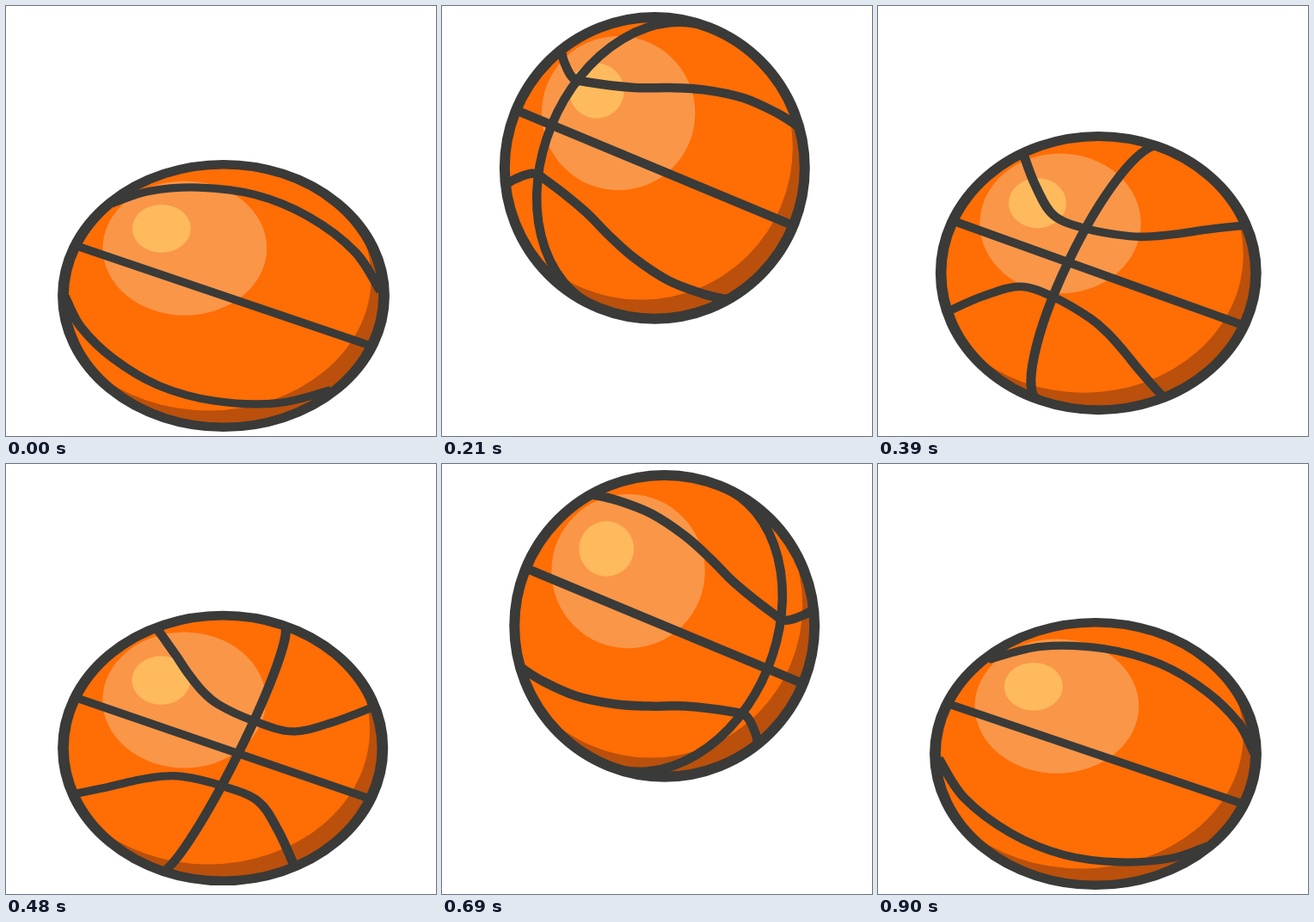
Recreate the animation shown at these times as an HTML page. Size 500 by 500 pixels, loop 0.93 s.

```html
<!DOCTYPE html>
<html lang="en">
<head>
<meta charset="utf-8">
<title>Bouncing ball</title>
<style>
  html, body { margin: 0; width: 100%; height: 100%; overflow: hidden; background: #fff; }
  svg { display: block; width: 100%; height: 100%; }
</style>
</head>
<body>
<svg viewBox="0 0 500 500">
  <defs>
    <clipPath id="disc"><circle r="180"/></clipPath>
  </defs>
  <g id="ball">
    <g clip-path="url(#disc)">
      <circle r="178" fill="#ba500b"/>
      <circle cx="-16" cy="-24" r="177" fill="#ff6d05"/>
      <circle cx="-42.3" cy="-63.5" r="89.5" fill="#fa9648"/>
      <circle cx="-67.7" cy="-89.5" r="32" fill="#feba5c"/>
      <g transform="rotate(22.5)" fill="none" stroke="#3a3a38" stroke-width="10.5">
        <path d="M-175 0H175"/>
        <path id="meridian"/>
        <path id="upper"/>
        <path id="lower"/>
      </g>
    </g>
    <circle r="175" fill="none" stroke="#3a3a38" stroke-width="12"/>
  </g>
</svg>
<script>
const LOOP = 930, STEP = 30, BOUNCE = 450, R = 175;
const $ = id => document.getElementById(id);
const ball = $('ball'), meridian = $('meridian'), upper = $('upper'), lower = $('lower');

const mix = (a, b, k) => a + (b - a) * k;
const smooth = k => k * k * (3 - 2 * k);

// Side seam for four spin angles: x along the equator, height above it.
const ANGLES = [0, 30, 66, 90];
const SEAMS = [
  [[-128, 118], [-88, 78], [-50, 50], [0, 45], [40, 46], [62, 56], [82, 72], [100, 90], [114, 104], [128, 118]],
  [[-147, 96], [-137, 75], [-110, 48], [-83, 51], [-26, 73], [5, 84], [36, 94.4], [70, 106], [100, 115], [126.5, 120]],
  [[-160, 75], [-154, 73.5], [-147, 72.5], [-138, 73], [-89, 81], [-45, 101], [0, 117], [58, 123], [114, 112], [144, 97.5]],
  [[-160, 66], [-159, 67.5], [-158, 69], [-156, 71], [-128, 98], [-80, 123], [-20, 137.5], [45, 133], [110, 109], [156, 71]]
];

// Slow start out of the squash, softer stop: cubic-bezier(.45, 0, .667, 1).
function ease(x) {
  let lo = 0, hi = 1;
  for (let i = 0; i < 24; i++) {
    const s = (lo + hi) / 2, r = 1 - s;
    if (1.35 * s * r * r + 2 * s * s * r + s * s * s < x) lo = s; else hi = s;
  }
  return smooth(lo);
}

// The fall mirrors the rise.
function pose(phase) {
  const rising = phase <= BOUNCE / 2;
  const t = rising ? phase : BOUNCE - phase;
  let dx, y, q = 1;
  if (t < 150) {
    q = ease(t / 150);
    dx = -7.75 * Math.sin(q * Math.PI / 2);
    y = mix(337, 242.5, q);
  } else {
    const f = Math.min(1, 2 * smooth((t - 150) / 150));
    dx = -7.75 + 15.5 * smooth((1 - Math.sqrt(1 - f)) / 2);
    y = 242.5 - 77 * f;
  }
  return { x: 253 + (rising ? dx : -dx), y, sx: mix(1.066, 0.997, q), sy: mix(0.873, 1.002, q) };
}

function seam(angle) {
  const a = Math.abs(angle), side = angle > 0 ? -1 : 1;
  let i = 0;
  while (i < 2 && a > ANGLES[i + 1]) i++;
  const k = (a - ANGLES[i]) / (ANGLES[i + 1] - ANGLES[i]);
  return SEAMS[i].map(([x, h], n) => {
    const [x2, h2] = SEAMS[i + 1][n];
    return [side * mix(x, x2, k), mix(h, h2, k)];
  });
}

// Catmull-Rom curve through the points.
function curve(pts, flip) {
  const at = n => pts[Math.max(0, Math.min(pts.length - 1, n))];
  const put = (x, y) => x.toFixed(2) + ' ' + (flip * y).toFixed(2) + ' ';
  let d = 'M' + put(...pts[0]);
  for (let n = 0; n < pts.length - 1; n++) {
    const [a, b, c, e] = [at(n - 1), at(n), at(n + 1), at(n + 2)];
    d += 'C' + put(b[0] + (c[0] - a[0]) / 6, b[1] + (c[1] - a[1]) / 6)
      + put(c[0] - (e[0] - b[0]) / 6, c[1] - (e[1] - b[1]) / 6) + put(...c);
  }
  return d;
}

function draw(now) {
  const t = Math.floor((now % LOOP) / STEP) * STEP;
  const p = pose(t % BOUNCE);
  ball.setAttribute('transform', `translate(${p.x} ${p.y}) scale(${p.sx} ${p.sy})`);

  const angle = t / 5 - 90;
  const rx = Math.abs(R * Math.sin(angle * Math.PI / 180));
  meridian.setAttribute('d', `M0 ${-R}A${rx} ${R} 0 0 ${angle > 0 ? 1 : 0} 0 ${R}`);
  const pts = seam(angle);
  upper.setAttribute('d', curve(pts, -1));
  lower.setAttribute('d', curve(pts, 1));
}

let start;
function tick(now) {
  if (start === undefined) start = now;
  draw(Math.max(0, now - start));
  requestAnimationFrame(tick);
}
draw(0);
requestAnimationFrame(tick);
</script>
</body>
</html>
```
